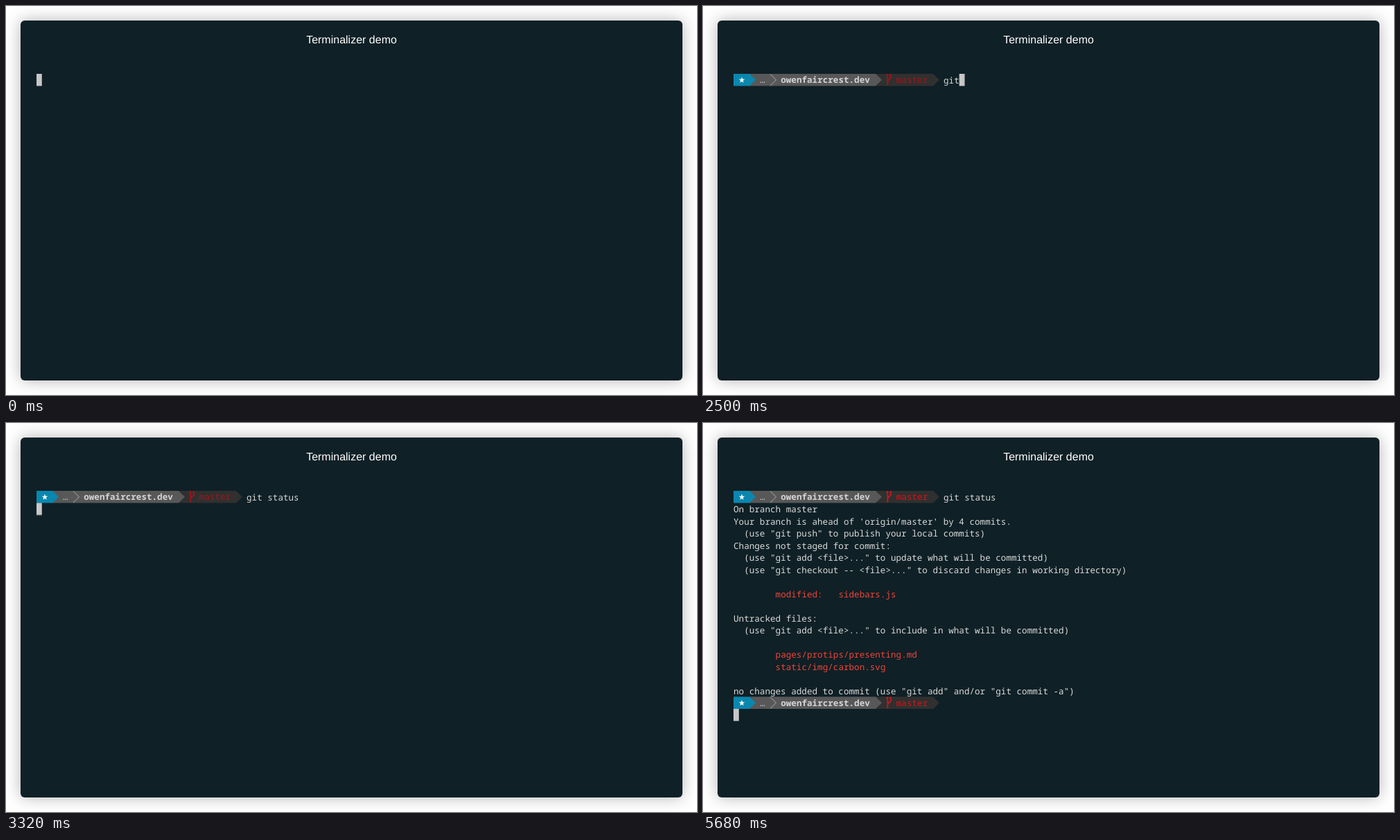
Animation of 997x562 px, one loop 6.35 s. Source, as an HTML page:

```html
<!DOCTYPE html>
<html lang="en">
<head>
<meta charset="utf-8">
<title>Terminalizer demo</title>
<style>
  :root { --c: 7.575px; --row: 17.5px; --loop: 6350ms; }
  html, body { margin: 0; width: 100%; height: 100%; overflow: hidden; background: #fff; }
  svg { display: block; }
  text {
    font: 12.625px "Noto Sans Mono", "DejaVu Sans Mono", monospace;
    font-variant-ligatures: none;
    text-rendering: geometricPrecision;
    white-space: pre;
    fill: #dadada;
  }
  .title { font: 16px "Liberation Sans", Arial, sans-serif; fill: #fff; text-anchor: middle; }
  .window { fill: #0f2026; filter: drop-shadow(0 0 11px rgba(0, 0, 0, .3)); }
  .dir { font-weight: 600; fill: #d4d4d4; }
  .dots { fill: #c0c0c0; }
  .file { fill: #f04439; }
  .branch { fill: var(--branch); }
  .fork { fill: none; stroke: var(--branch); stroke-width: 1.7; }
  .cursor { fill: #c7c7c7; }

  .prompt, .output, .next, .cursor, .typed { animation: var(--loop) step-end infinite; }
  .prompt { animation-name: prompt; }
  .output { animation-name: output; }
  .next { animation-name: next; --branch: #d0161a; }
  .typed { animation-name: type; }
  .cursor { animation-name: cursor; }

  @keyframes prompt {
    0% { visibility: hidden; --branch: #a81318; }
    5.039% { visibility: visible; --branch: #a81318; }
    57.952%, 100% { visibility: visible; --branch: #d0161a; }
  }
  @keyframes output {
    0% { visibility: hidden; }
    52.598%, 100% { visibility: visible; }
  }
  @keyframes next {
    0% { visibility: hidden; }
    57.952%, 100% { visibility: visible; }
  }
  /* one cell per keystroke */
  @keyframes type {
    0% { width: 0; }
    36.535% { width: calc(1 * var(--c)); }
    38.11% { width: calc(2 * var(--c)); }
    39.37% { width: calc(3 * var(--c)); }
    40.787% { width: calc(4 * var(--c)); }
    42.047% { width: calc(5 * var(--c)); }
    43.622% { width: calc(6 * var(--c)); }
    45.669% { width: calc(7 * var(--c)); }
    46.614% { width: calc(8 * var(--c)); }
    48.346% { width: calc(9 * var(--c)); }
    50.078%, 100% { width: calc(10 * var(--c)); }
  }
  @keyframes cursor {
    0% { transform: translate(0, 0); }
    5.039% { transform: translate(calc(40 * var(--c)), 0); }
    36.535% { transform: translate(calc(41 * var(--c)), 0); }
    38.11% { transform: translate(calc(42 * var(--c)), 0); }
    39.37% { transform: translate(calc(43 * var(--c)), 0); }
    40.787% { transform: translate(calc(44 * var(--c)), 0); }
    42.047% { transform: translate(calc(45 * var(--c)), 0); }
    43.622% { transform: translate(calc(46 * var(--c)), 0); }
    45.669% { transform: translate(calc(47 * var(--c)), 0); }
    46.614% { transform: translate(calc(48 * var(--c)), 0); }
    48.346% { transform: translate(calc(49 * var(--c)), 0); }
    50.078% { transform: translate(calc(50 * var(--c)), 0); }
    52.283% { transform: translate(0, var(--row)); }
    52.598% { transform: translate(0, calc(17 * var(--row))); }
    57.952% { transform: translate(calc(40 * var(--c)), calc(17 * var(--row))); }
    89.448%, 100% { transform: translate(0, calc(18 * var(--row))); }
  }
</style>
</head>
<body>
<svg width="997" height="562" viewBox="0 0 997 562">
  <defs>
    <g id="prompt">
      <path fill="#303030" d="M248 98H332L341 106.75L332 115.5H248Z"/>
      <path fill="#585858" d="M66 98H249L258 106.75L249 115.5H66Z"/>
      <path fill="#0a87af" d="M44 98H67L76 106.75L67 115.5H44Z"/>
      <path fill="#fff" d="M56 102.6L57.1 105.7L60.3 105.8L57.7 107.8L58.7 111L56 109.1L53.3 111L54.3 107.8L51.7 105.8L54.9 105.7Z"/>
      <path fill="none" stroke="#8f8f8f" stroke-width="1.1" d="M97 98.3L105.5 106.75L97 115.2"/>
      <text class="dots" x="81.9" y="111.2">…</text>
      <text class="dir" x="112.2" y="111.2">owenfaircrest.dev</text>
      <path class="fork" d="M264.2 99.3H266.4V114.8M269 99.3H271.2V103.6L266.4 108.6"/>
      <text class="branch" x="278.8" y="111.2">master</text>
    </g>
    <clipPath id="typed"><rect class="typed" x="347" y="98" width="0" height="17.5"/></clipPath>
  </defs>

  <rect class="window" x="21" y="21" width="955" height="520" rx="6"/>
  <text class="title" x="498.5" y="53.5">Terminalizer demo</text>

  <use class="prompt" href="#prompt"/>
  <g clip-path="url(#typed)"><text x="347" y="111.5">git status</text></g>

  <g class="output">
    <text x="44" y="129">On branch master</text>
    <text x="44" y="146.5">Your branch is ahead of 'origin/master' by 4 commits.</text>
    <text x="59.15" y="164">(use "git push" to publish your local commits)</text>
    <text x="44" y="181.5">Changes not staged for commit:</text>
    <text x="59.15" y="199">(use "git add &lt;file&gt;..." to update what will be committed)</text>
    <text x="59.15" y="216.5">(use "git checkout -- &lt;file&gt;..." to discard changes in working directory)</text>
    <text class="file" x="104.6" y="251.5">modified:   sidebars.js</text>
    <text x="44" y="286.5">Untracked files:</text>
    <text x="59.15" y="304">(use "git add &lt;file&gt;..." to include in what will be committed)</text>
    <text class="file" x="104.6" y="339">pages/protips/presenting.md</text>
    <text class="file" x="104.6" y="356.5">static/img/carbon.svg</text>
    <text x="44" y="391.5">no changes added to commit (use "git add" and/or "git commit -a")</text>
  </g>

  <use class="next" href="#prompt" y="297.5"/>
  <rect class="cursor" x="44" y="98" width="7.8" height="17.5"/>
</svg>
</body>
</html>
```
